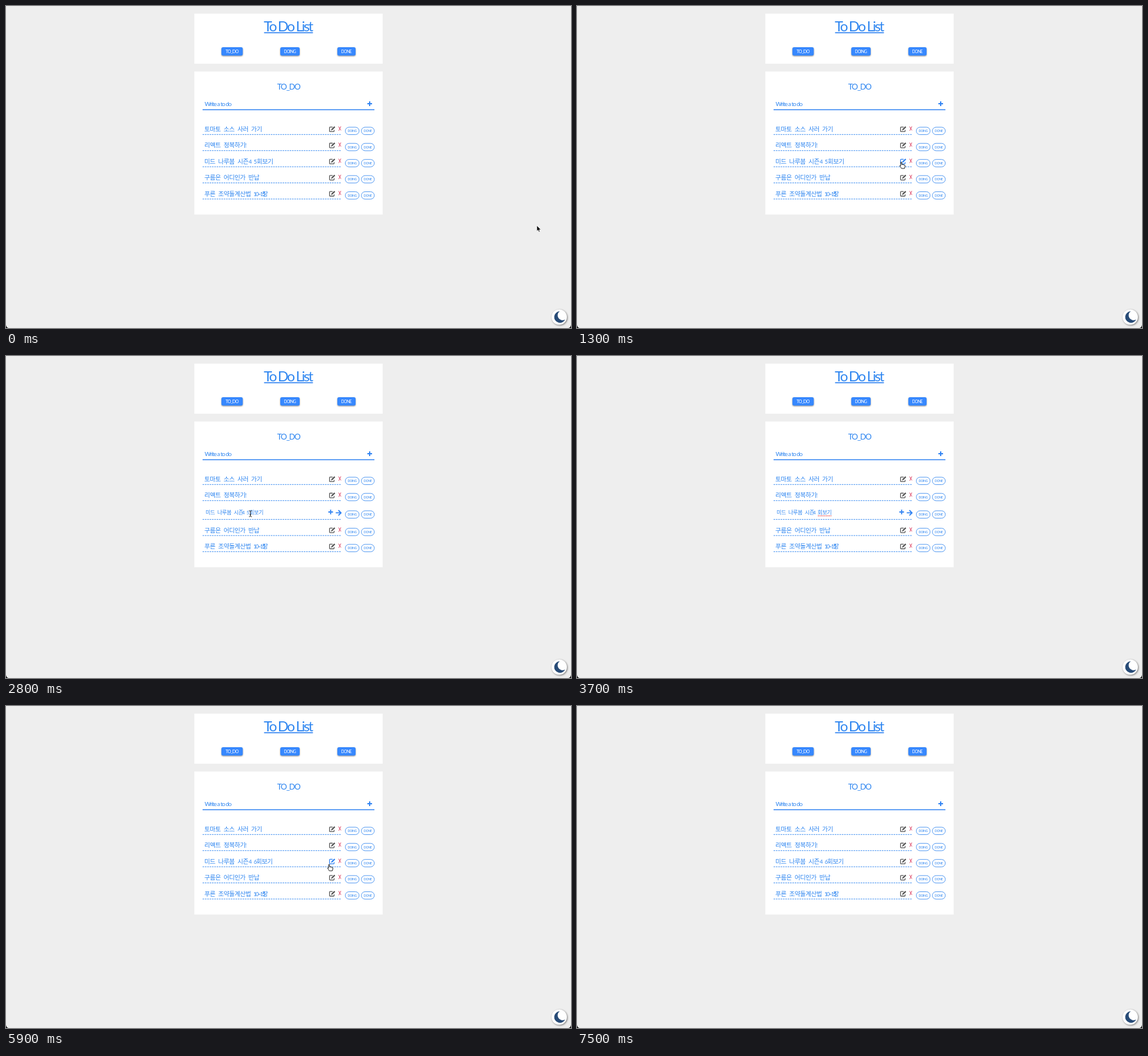
These frames come from a looping animation (960x547 px, 7.6 s). An HTML page:

```html
<!DOCTYPE html>
<html lang="ko">
<head>
<meta charset="utf-8">
<title>To Do List</title>
<style>
  html, body { margin: 0; width: 100%; height: 100%; overflow: hidden; background: #111; }
  svg { display: block; width: 960px; height: 547px; }
  text { fill: #2f86f0; white-space: pre; }
  .hand { font-family: Lato, sans-serif; letter-spacing: -.1em; }
  .mid { text-anchor: middle; }
  .ko { font-family: "Noto Sans CJK KR", "Noto Sans CJK", sans-serif; font-weight: 500;
        letter-spacing: -.043em; word-spacing: .22em; }
  .num { font-family: Lato, sans-serif; letter-spacing: -.16em; }
  .tab rect { fill: #3788ff; filter: drop-shadow(0 1.5px 1.2px rgba(0, 0, 0, .45)); }
  .tab text { fill: #fff; }
  .pill rect { fill: #fff; stroke: #3b8cf0; stroke-width: .9; }
  .blue { stroke: #2f82f2; fill: none; }
  .dash { stroke: #3b8cf0; stroke-dasharray: 2.7 1.3; }
  .edit { fill: none; stroke: #555; }
  .edit.on { stroke: #2f82f2; }
  .cross { fill: none; stroke: #dc3f62; stroke-width: 1; }
</style>
</head>
<body>
<svg id="stage" viewBox="0 0 960 547" xmlns="http://www.w3.org/2000/svg"></svg>
<script>
const LOOP = 7600, STEP = 100, OPEN = 1700, ERASE = 3400, TYPE = 4300, SAVE = 5700;
const ROW_Y = 218.3, PITCH = 27.4, GROW = 4.5, ACTIVE = 2;

// each row: pieces of [x, text]
const rows = [
  [[337, '토마토 소스 사러 가기']],
  [[337, '리액트 정복하기'], [406.5, '!']],
  [[337, '미드 나루봄 시즌'], [412.5, '4'], [421, '5'], [426, '회보기']],
  [[337, '구름은 어디인가 반납']],
  [[337, '푸른 조약돌계산법'], [420.5, '10~15'], [435.5, '장']]
];

// pointer path: time, x, y
const path = [
  [0, 902, 373], [100, 902, 373], [600, 604, 306], [800, 604, 306], [1300, 551, 265],
  [2200, 551, 265], [2800, 415, 268], [4500, 415, 268], [4800, 527, 270],
  [5300, 550, 269], [5900, 549, 269], [6300, 549, 269], [7100, 980, 400]
];
const hidden = [[3200, 4500], [7100, LOOP]];

const text = (x, y, size, str, cls) =>
  `<text x="${x}" y="${y}" font-size="${size}" class="${cls}">${str}</text>`;
const box = (x, y, w, h, r = 0) => `<rect x="${x}" y="${y}" width="${w}" height="${h}" rx="${r}"/>`;
const group = (cls, body) => `<g class="${cls}">${body}</g>`;
const plus = (x, y, w, id = '') =>
  `<path ${id} class="blue" stroke-width="${w}" d="M${x - 4} ${y}h8M${x} ${y - 4}v8"/>`;
const words = (pieces, y, size, small) => pieces.map(([x, s]) =>
  /[가-힣]/.test(s) ? text(x, y, size, s, 'ko') : text(x, y, small, s, 'num')).join('');

const tab = (x, w, label, size) =>
  group('tab', box(x, 70, w, 14.3, 3) + text(x + w / 2 - .3, 79.8, size, label, 'hand mid'));
const pill = (x, w, label) =>
  group('pill', box(x, -12.4, w, 12.6, 6.3) + text(x + w / 2 - .2, -4.1, 5.4, label, 'hand mid'));

const editIcon = `<g class="edit" transform="translate(549 -14.3)">
  <path stroke-width="1.3" d="M6 1.6H1.7Q.7 1.6.7 2.6V8.4Q.7 9.4 1.7 9.4H7.5Q8.5 9.4 8.5 8.4V6.4"/>
  <path stroke-width="2.3" d="M4.2 6.3L9.6 1.2"/><path stroke-width="1" d="M3.3 7.3L4.6 6.8"/></g>`;
const crossIcon = '<path class="cross" d="M565.2 -13.6Q567 -9.8 569.2 -7M569 -13.8Q567.4 -10 565.4 -6.4"/>';

const row = (pieces, i) => `<g id="row${i}">
  <g id="view${i}">${words(pieces, -5.3, 10.6, 9)}${editIcon}${crossIcon}</g>
  <path id="line${i}" class="dash" d="M334 0H570"/>
  <g id="pills${i}">${pill(576.5, 23.5, 'DOING')}${pill(603.8, 22, 'DONE')}</g></g>`;

const moon = `<g style="filter:drop-shadow(1px 1.5px 1.5px rgba(0,0,0,.5))">
  <circle cx="940" cy="528.5" r="13" fill="#fff"/></g>
  <path fill="#274b77" d="M941 518.6A9.8 9.8 0 1 0 950.2 532.4A8.2 8.2 0 0 1 941 518.6Z"/>`;

const cursors = `<g id="cursor" stroke-linejoin="round">
  <path id="arrow" fill="#000" stroke="#fff" stroke-width=".7"
    d="M0 0V9.6L2.1 7.6L3.6 11L5.2 10.3L3.8 7.1H6.8Z"/>
  <path id="point" fill="#fff" stroke="#000" stroke-width=".9"
    d="M-.9 .6Q0 -.6 .9 .6V4.2L3 4.4L5 5L6.3 5.7V8L5.4 11H.4L-1.4 8.3L-2.6 6.2Q-2 5.2-.9 6.4Z"/>
  <path id="beam" fill="none" stroke="#222" stroke-width="1"
    d="M-2.2 -5Q-.2 -5 .3 -4.2Q.8 -5 2.8 -5M.3 -4.2V4.2M-2.2 5Q-.2 5 .3 4.2Q.8 5 2.8 5M-1 1.8H1.6"/></g>`;

document.getElementById('stage').innerHTML = `
  <rect width="960" height="547" fill="#111"/>
  <path fill="#eee" d="M0 0H960V542Q959 547 955 547H5Q1 547 0 542Z"/>
  <g fill="#fff">${box(320, 13, 320, 85)}<rect id="card" x="320" y="111.3" width="320" height="243"/></g>
  ${text(479, 43, 24, 'To Do List', 'hand mid')}
  <path class="blue" stroke-width="1.8" d="M438.5 45.3H521.5"/>
  ${tab(366, 36.3, 'TO_DO', 7.6)}${tab(466, 33, 'DOING', 7)}${tab(563, 31, 'DONE', 7)}
  ${text(480, 142, 13.4, 'TO_DO', 'hand mid')}
  ${text(337.5, 169.8, 10, 'Write a to do', 'hand')}
  ${plus(618, 166, 2)}
  <path class="blue" stroke-width="1.4" d="M334 176.3H626"/>
  ${rows.map(row).join('')}
  <g id="form">${words([[339, '미드 나루봄 시즌'], [401, '4']], 269.3, 9.07, 8)}
    <text id="digit" class="num" x="408.7" y="269.3" font-size="8"></text>
    <g id="tail">${text(0, 269.3, 9.07, '회보기', 'ko')}
      <path id="spell" d="M.8 271.6H23.5" stroke="#e5484d" stroke-width="1.5" stroke-dasharray="1.5 1.2"/></g>
    ${plus(551.6, 265, 1.9, 'id="save"')}
    <path class="blue" stroke-width="1.9" d="M560.3 266.4H568.8M564.8 262L569.2 266.4L564.8 270.8"/></g>
  ${moon}${cursors}`;

const $ = id => document.getElementById(id);
const show = (el, on) => { el.style.display = on ? '' : 'none'; };
const move = (el, x, y) => el.setAttribute('transform', `translate(${x} ${y})`);
const within = (x, y, x0, x1, y0, y1) => x >= x0 && x <= x1 && y >= y0 && y <= y1;

const view = $('view' + ACTIVE), icon = view.querySelector('.edit');
const [, , episode, ending] = view.querySelectorAll('text');

function pointer(t) {
  const i = path.findIndex(p => p[0] > t);
  if (i < 0) return path[path.length - 1].slice(1);
  const [t0, x0, y0] = path[i - 1], [t1, x1, y1] = path[i];
  const u = (t - t0) / (t1 - t0), k = u * u * (3 - 2 * u);
  return [x0 + (x1 - x0) * k, y0 + (y1 - y0) * k];
}

function draw(t) {
  const open = t >= OPEN && t < SAVE, saved = t >= SAVE;
  const grow = open ? GROW : 0;
  $('card').setAttribute('height', 243 + grow);
  rows.forEach((_, i) => move($('row' + i), 0, ROW_Y + i * PITCH + (i > ACTIVE ? grow : 0)));
  move($('line' + ACTIVE), 0, grow);
  move($('pills' + ACTIVE), 0, grow / 2);
  show(view, !open);
  show($('form'), open);

  episode.textContent = saved ? '6' : '5';
  ending.setAttribute('x', saved ? 425.2 : 426);
  $('digit').textContent = t < ERASE ? '5' : t < TYPE ? '' : '6';
  move($('tail'), t < ERASE ? 413.3 : t < TYPE ? 408.7 : 412.5, 0);
  show($('spell'), t >= ERASE);

  const [x, y] = pointer(t);
  const visible = !hidden.some(([a, b]) => t >= a && t < b);
  const onSave = open && visible && within(x, y, 546, 558, 259, 272);
  const onEdit = !open && visible && within(x, y, 547, 561, 258, 271);
  const onField = open && !onSave && within(x, y, 334, 546, 256, 277);
  $('save').style.stroke = onSave ? '#dc3545' : '';
  icon.classList.toggle('on', onEdit);
  show($('cursor'), visible);
  move($('cursor'), x, y);
  show($('point'), onSave || onEdit);
  show($('beam'), onField);
  show($('arrow'), !onSave && !onEdit && !onField);
}

const start = performance.now();
function tick(now) {
  const t = Math.max(0, now - start) % LOOP;
  draw(Math.floor(t / STEP) * STEP);
  requestAnimationFrame(tick);
}
draw(0);
requestAnimationFrame(tick);
</script>
</body>
</html>
```
